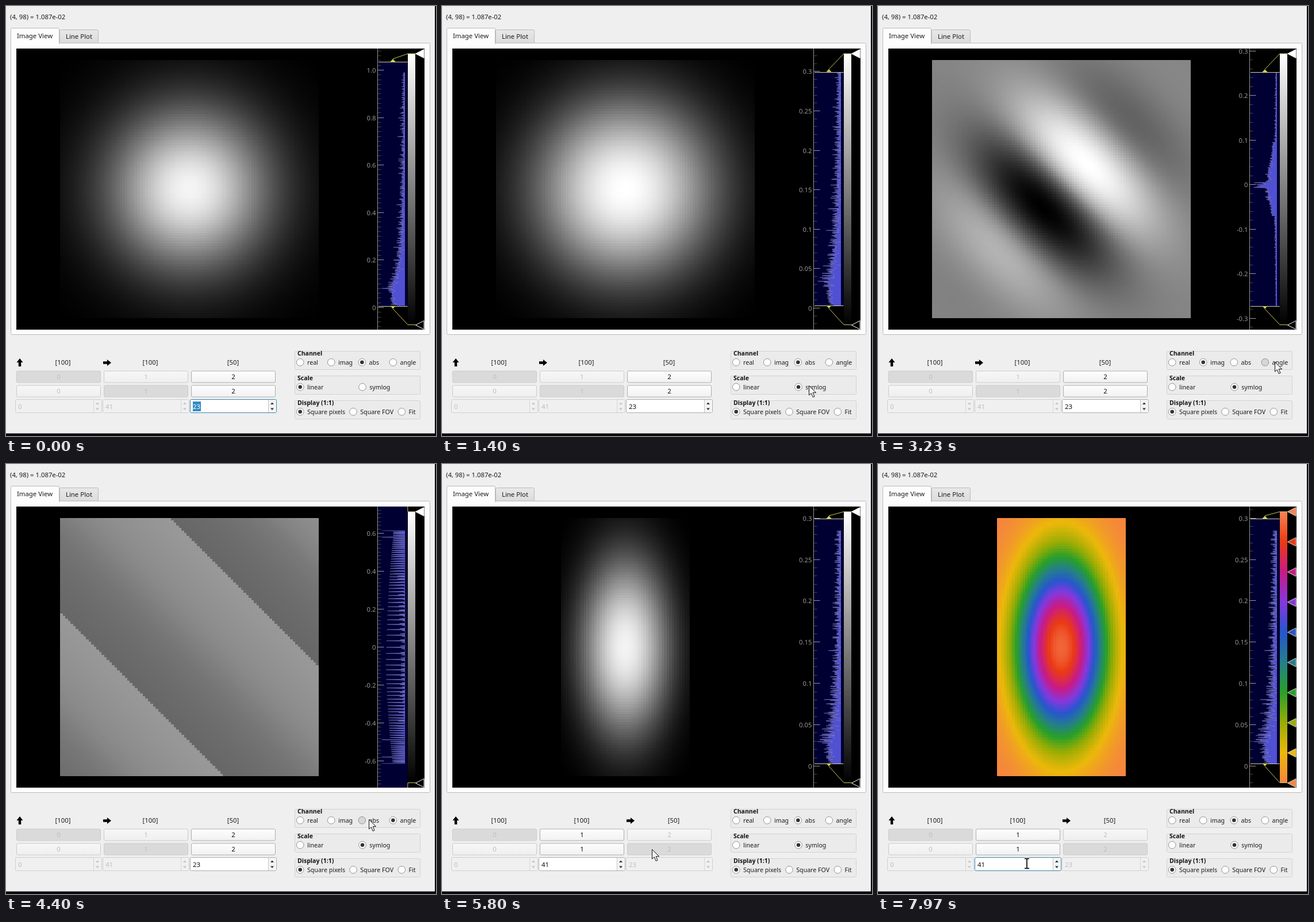
Recreate the animation shown at these times as an HTML page with a canvas. Size 748x748 px, loop 8 s.

```html
<!DOCTYPE html>
<html lang="en">
<head>
<meta charset="utf-8">
<title>Array viewer</title>
<style>
html, body { margin: 0; width: 100%; height: 100%; overflow: hidden; background: #efefef; }
canvas { display: block; width: 748px; height: 748px; }
</style>
</head>
<body>
<canvas id="stage" width="748" height="748"></canvas>
<script>
const g = document.getElementById('stage').getContext('2d');
const LOOP = 8000;
const FONT = '"Noto Sans", "Open Sans", sans-serif';
const VIEW = { x: 18, y: 74, w: 710, h: 489 };
const COLS = [18, 170, 322];
const BAR = { x: 699, y: 83, w: 13, h: 471 };

// Colour maps, listed from low to high.
const GRAY = [[0, 0, 0], [255, 255, 255]];
const VIRIDIS = [[68, 1, 84], [72, 40, 120], [62, 74, 137], [49, 104, 142], [38, 130, 142],
  [31, 158, 137], [53, 183, 121], [110, 206, 88], [181, 222, 43], [253, 231, 37]];
const CYCLIC = [[245, 133, 62], [236, 184, 10], [152, 172, 4], [40, 160, 40], [36, 126, 140],
  [38, 86, 206], [133, 56, 222], [200, 26, 134], [234, 58, 20], [245, 132, 82]];

// zero: pixel row of value 0, scale: pixels per unit
const LINEAR = { ch: 'abs', log: false, axis: 1, lo: 0.0055, hi: 1.034, zero: 524, scale: 413, major: 0.2, minor: 0.02, map: GRAY };
const SYMLOG = { ch: 'abs', log: true, axis: 1, lo: 0.0029, hi: 0.299, zero: 525, scale: 1372, major: 0.05, minor: 0.01, map: GRAY };
const IMAG = { ch: 'imag', log: true, axis: 1, lo: -0.2735, hi: 0.2516, zero: 310, scale: 775, major: 0.1, minor: 0.02, map: GRAY };
const ANGLE = { ch: 'angle', log: true, axis: 1, lo: -Math.PI, hi: Math.PI, zero: 318, scale: 330.8, major: 0.2, minor: 0.02, map: GRAY };
const SIDE = { ...SYMLOG, axis: 2, scale: 1438 };

const SCENES = [
  [0, LINEAR], [1270, SYMLOG], [2230, IMAG], [3270, ANGLE], [4465, SYMLOG],
  [5800, SIDE], [7030, { ...SIDE, map: VIRIDIS }], [7970, { ...SIDE, map: CYCLIC }]
];
const PRESSES = [[1170, 1270, 'symlog'], [2130, 2230, 'imag'], [3170, 3270, 'angle'],
  [4400, 4465, 'abs'], [5730, 5800, 'button']];
const PATH = [
  [400, 661, 742], [770, 636, 651], [969, 636, 651], [970, 637, 652], [1270, 637, 652],
  [1400, 638, 660], [1600, 582, 617], [2470, 582, 617], [3070, 690, 619], [3270, 690, 619],
  [3770, 631, 618], [4465, 631, 618], [4970, 290, 675], [5130, 287, 667], [5230, 287, 667],
  [5370, 365, 670], [5970, 365, 670], [6430, 259, 695], [LOOP, 259, 695]
];

const norm = (i, n) => 2 * i / (n - 1) - 1;
const symlog = v => Math.sign(v) * Math.log10(1 + Math.abs(v));

function mapColour(map, v) {
  const p = Math.min(1, Math.max(0, v)) * (map.length - 1);
  const i = Math.min(map.length - 2, Math.floor(p));
  return map[i].map((c, k) => Math.round(c + (map[i + 1][k] - c) * (p - i)));
}

// Gaussian with a linear phase, sampled on a 100 x 100 x 50 grid.
function sample(ch, a, b, c) {
  const mag = Math.exp(-2.5 * (a * a + b * b + c * c));
  const phase = 1.25 * Math.PI * (a + b + c);
  if (ch === 'abs') return mag;
  if (ch === 'imag') return mag * Math.sin(phase);
  return Math.atan2(Math.sin(phase), Math.cos(phase));
}

function prepare(s) {
  const cols = s.axis === 1 ? 100 : 50;
  const vals = [];
  for (let r = 0; r < 100; r++) {
    for (let c = 0; c < cols; c++) {
      const a = norm(99 - r, 100), h = norm(c, cols);
      const v = s.axis === 1 ? sample(s.ch, a, h, norm(23, 50)) : sample(s.ch, a, norm(41, 100), h);
      vals.push(s.log ? symlog(v) : v);
    }
  }
  s.cols = cols;
  s.pic = document.createElement('canvas');
  s.pic.width = cols;
  s.pic.height = 100;
  const pg = s.pic.getContext('2d');
  const img = pg.createImageData(cols, 100);
  vals.forEach((v, i) => img.data.set([...mapColour(s.map, (v - s.lo) / (s.hi - s.lo)), 255], i * 4));
  pg.putImageData(img, 0, 0);

  s.min = Math.min(...vals);
  s.step = (Math.max(...vals) - s.min) / 500;
  s.bins = new Array(500).fill(0);
  for (const v of vals) s.bins[Math.min(499, Math.floor((v - s.min) / s.step))]++;
  s.peak = Math.max(...s.bins);
}
SCENES.forEach(([, s]) => { if (!s.pic) prepare(s); });

function text(str, x, y, size = 11.5, color = '#1b1b1b', align = 'left', weight = 400) {
  g.font = `${weight} ${size}px ${FONT}`;
  g.textAlign = align;
  g.fillStyle = color;
  g.fillText(str, x, y);
}

function rect(x, y, w, h, fill) {
  g.fillStyle = fill;
  g.fillRect(x, y, w, h);
}

function box(x, y, w, h, fill, stroke, radius = 2) {
  g.beginPath();
  g.roundRect(x + 0.5, y + 0.5, w - 1, h - 1, radius);
  g.fillStyle = fill;
  g.fill();
  g.strokeStyle = stroke;
  g.lineWidth = 1;
  g.stroke();
}

function line(color, width, ...pts) {
  g.beginPath();
  pts.forEach(([x, y]) => g.lineTo(x, y));
  g.strokeStyle = color;
  g.lineWidth = width;
  g.stroke();
}

function poly(fill, stroke, ...pts) {
  g.beginPath();
  pts.forEach(([x, y]) => g.lineTo(x, y));
  g.closePath();
  if (fill) { g.fillStyle = fill; g.fill(); }
  if (stroke) { g.strokeStyle = stroke; g.lineWidth = 1; g.stroke(); }
}

function vGradient(y0, y1, stops) {
  const grad = g.createLinearGradient(0, y0, 0, y1);
  stops.forEach((c, i) => grad.addColorStop(i / (stops.length - 1), c));
  return grad;
}

function drawFrame() {
  rect(0, 0, 748, 748, '#08080c');
  rect(0, 0, 746, 743.5, '#efefef');
  text('(4, 98) = 1.087e-02', 7, 23, 11.3);
  box(8, 64, 730, 508, '#fdfdfd', '#bababa');
  box(93, 41, 68, 24, vGradient(41, 64, ['#e8e8e8', '#dcdcdc']), '#bababa');
  box(8, 38, 85, 30, '#fdfdfd', '#bababa');
  rect(9, 65, 83, 5, '#fdfdfd');
  text('Image View', 50, 56, 11.4, '#1b1b1b', 'center');
  text('Line Plot', 127, 57, 11.4, '#1b1b1b', 'center');
}

function drawTicks(s) {
  const top = (s.zero - VIEW.y) / s.scale;
  const bottom = (s.zero - VIEW.y - VIEW.h) / s.scale;
  for (let i = Math.ceil(bottom / s.minor); i * s.minor <= top; i++) {
    const y = Math.round(s.zero - i * s.minor * s.scale) + 0.5;
    line('rgba(150,150,150,.42)', 1, [647, y], [652.5, y]);
  }
  for (let i = Math.ceil(bottom / s.major); i * s.major <= top; i++) {
    const v = Number((i * s.major).toFixed(2));
    const y = Math.round(s.zero - v * s.scale) + 0.5;
    line('#969696', 1, [647, y], [657.5, y]);
    text(v === 1 ? '1.0' : String(v), 643.5, y + 4, 11.3, '#969696', 'right');
  }
  line('#969696', 1, [646.5, VIEW.y], [646.5, VIEW.y + VIEW.h]);
}

function drawHistogram(s) {
  const yHi = s.zero - s.hi * s.scale, yLo = s.zero - s.lo * s.scale;
  g.save();
  g.beginPath();
  g.rect(648, VIEW.y, 50.5, VIEW.h);
  g.clip();
  const pts = s.bins.map((n, i) => [694 - 40.5 * n / s.peak, s.zero - (s.min + i * s.step) * s.scale]);
  poly('rgb(100,100,200)', null, [694, pts[0][1]], ...pts, [694, pts[499][1]]);
  line('rgba(200,200,200,.4)', 1, ...pts);
  rect(648, yHi, 51, yLo - yHi, 'rgba(0,0,255,.2)');
  for (const y of [yHi, yLo]) line('#d2d2bc', 1, [648, Math.round(y) + 0.5], [699, Math.round(y) + 0.5]);
  poly('#d0d040', null, [668.5, yHi], [677.5, yHi], [673, yHi - 5]);
  poly('#d0d040', null, [668.5, yLo], [677.5, yLo], [673, yLo + 5]);
  g.restore();

  const end = BAR.x + BAR.w, low = BAR.y + BAR.h;
  rect(BAR.x, BAR.y, BAR.w, BAR.h,
    vGradient(BAR.y, low, s.map.map(c => `rgb(${c})`).reverse()));
  line('#c8c864', 1, [673, yHi - 5], [BAR.x, BAR.y], [end, BAR.y]);
  line('#c8c864', 1, [673, yLo + 5], [BAR.x, low + 0.5], [end, low + 0.5]);
  const last = s.map.length - 1;
  s.map.forEach((c, i) => {
    const y = 555 - 472 * i / last;
    poly(`rgb(${c})`, last > 1 ? '#e0d8d0' : '#fff', [712.5, y], [727, y - 7.5], [727, y + 7.5]);
  });
}

function drawPlot(s) {
  g.save();
  g.beginPath();
  g.rect(VIEW.x, VIEW.y, VIEW.w, VIEW.h);
  g.clip();
  rect(VIEW.x, VIEW.y, VIEW.w, VIEW.h, '#000');
  g.imageSmoothingEnabled = false;
  const w = s.cols * 4.496;
  g.drawImage(s.pic, 318.9 - w / 2, 93.5, w, 449.8);
  drawHistogram(s);
  drawTicks(s);
  g.restore();
}

function button(x, y, label, state) {
  const fills = {
    on: vGradient(y, y + 21, ['#fefefe', '#f1f1f1']),
    off: vGradient(y, y + 21, ['#f7f7f7', '#efefef']),
    checked: '#dadada',
    down: '#d4d4d4'
  };
  const live = state === 'on' || state === 'down';
  box(x, y, 147, 21, fills[state], live ? '#adadad' : '#cbcbcb');
  text(label, x + 73.5, y + 14.5, 11.5, live ? '#111' : '#bebebe', 'center');
}

function spin(x, value, live, focus, selected, caret) {
  const edge = focus ? '#3b85ad' : live ? '#adadad' : '#cfcfcf';
  box(x - 2, 684, 151, 24, live ? '#fff' : '#f0f0f0', edge);
  rect(x + 135, 685, 12.5, 22, live ? '#f4f4f4' : '#f0f0f0');
  line(live ? '#c6c6c6' : '#d6d6d6', 1, [x + 134.5, 685], [x + 134.5, 707]);
  const ink = live ? '#333' : '#c4c4c4';
  poly(ink, null, [x + 138, 693], [x + 144, 693], [x + 141, 689.5]);
  poly(ink, null, [x + 138, 699.5], [x + 144, 699.5], [x + 141, 703]);
  if (selected) rect(x + 3, 688, 14, 17, '#308cc6');
  text(value, x + 3, 700.5, 11.5, selected ? '#fff' : live ? '#111' : '#bebebe');
  if (caret) line('#111', 1, [x + 16.5, 689], [x + 16.5, 703]);
}

function arrowGlyph(x, y, turn) {
  g.save();
  g.translate(x, y);
  g.rotate(turn);
  poly('#000', null, [-7, -2.2], [0, -2.2], [0, -5.5], [7, 0], [0, 5.5], [0, 2.2], [-7, 2.2]);
  g.restore();
}

function drawControls(s, t, press) {
  const sizes = ['[100]', '[100]', '[50]'];
  const values = ['0', '41', '23'];
  COLS.forEach((x, i) => {
    const up = i === 0, across = i === s.axis, live = !up && !across;
    text(sizes[i], x + 73 + (live ? 0 : 8), 624, 11.3, '#1b1b1b', 'center');
    if (up) arrowGlyph(x + 6, 620, -Math.PI / 2);
    if (across) arrowGlyph(x + 6, 620.5, 0);
    button(x, 634.5, String(i), up ? 'checked' : live ? 'on' : 'off');
    const held = press === 'button' && i === 2;
    button(x, 659.5, String(i), held ? 'down' : across ? 'checked' : live ? 'on' : 'off');
    const first = i === 2 && t < 1170, later = i === 1 && t >= 6570;
    spin(x, values[i], live, first || later, first, later && t >= 6700 && t < 7870);
  });
}

function radio(x, y, label, on, held) {
  g.beginPath();
  g.arc(x, y, 6.3, 0, 7);
  g.fillStyle = held ? '#d6d6d6' : '#fff';
  g.fill();
  g.strokeStyle = '#929292';
  g.lineWidth = 1;
  g.stroke();
  if (on) {
    g.beginPath();
    g.arc(x, y, 3.3, 0, 7);
    g.fillStyle = '#333';
    g.fill();
  }
  text(label, x + 12.3, y + 4.3, 10.6);
}

function group(y, title, items, chosen, press) {
  box(502, y, 219, 33, '#ebebeb', '#d2d2d2');
  text(title, 507, y + 7.5, 10.5, '#111', 'left', 700);
  items.forEach(([x, label]) => radio(x, y + 19.8, label, label === chosen, label === press));
}

function drawOptions(s, press) {
  group(600, 'Channel', [[511.7, 'real'], [565.7, 'imag'], [619.3, 'abs'], [673.3, 'angle']], s.ch, press);
  group(643, 'Scale', [[511.7, 'linear'], [620, 'symlog']], s.log ? 'symlog' : 'linear', press);
  group(686, 'Display (1:1)', [[511.7, 'Square pixels'], [604, 'Square FOV'], [688.3, 'Fit']], 'Square pixels', press);
}

function pointerAt(t) {
  if (t < PATH[0][0]) return null;
  const i = PATH.findIndex(p => p[0] > t);
  const [t0, x0, y0] = PATH[i - 1], [t1, x1, y1] = PATH[i];
  const k = (t - t0) / (t1 - t0), e = k * k * (3 - 2 * k);
  return [x0 + (x1 - x0) * e, y0 + (y1 - y0) * e];
}

function drawPointer(t) {
  const p = pointerAt(t);
  if (!p) return;
  g.save();
  g.translate(Math.round(p[0]), Math.round(p[1]));
  g.lineJoin = 'round';
  if (t > 5970 && p[0] < 318 && p[1] > 684) {
    for (const [color, w] of [['#fff', 4], ['#111', 1.8]]) {
      line(color, w, [0, -8.5], [0, 8.5]);
      line(color, w, [-4, -8.5], [4, -8.5]);
      line(color, w, [-4, 8.5], [4, 8.5]);
    }
  } else {
    poly('#f6f6f6', '#111', [0.5, 0.5], [0.5, 17], [4.3, 13.6], [7.2, 20.5], [10, 19.3], [7.2, 12.6], [12.6, 12.6]);
  }
  g.restore();
}

function draw(t) {
  const scene = SCENES.filter(([start]) => start <= t).pop()[1];
  const press = (PRESSES.find(([a, b]) => t >= a && t < b) || [])[2];
  drawFrame();
  drawPlot(scene);
  drawControls(scene, t, press);
  drawOptions(scene, press);
  drawPointer(t);
}

const start = performance.now();
function tick() {
  draw((performance.now() - start) % LOOP);
  requestAnimationFrame(tick);
}
tick();
</script>
</body>
</html>
```
